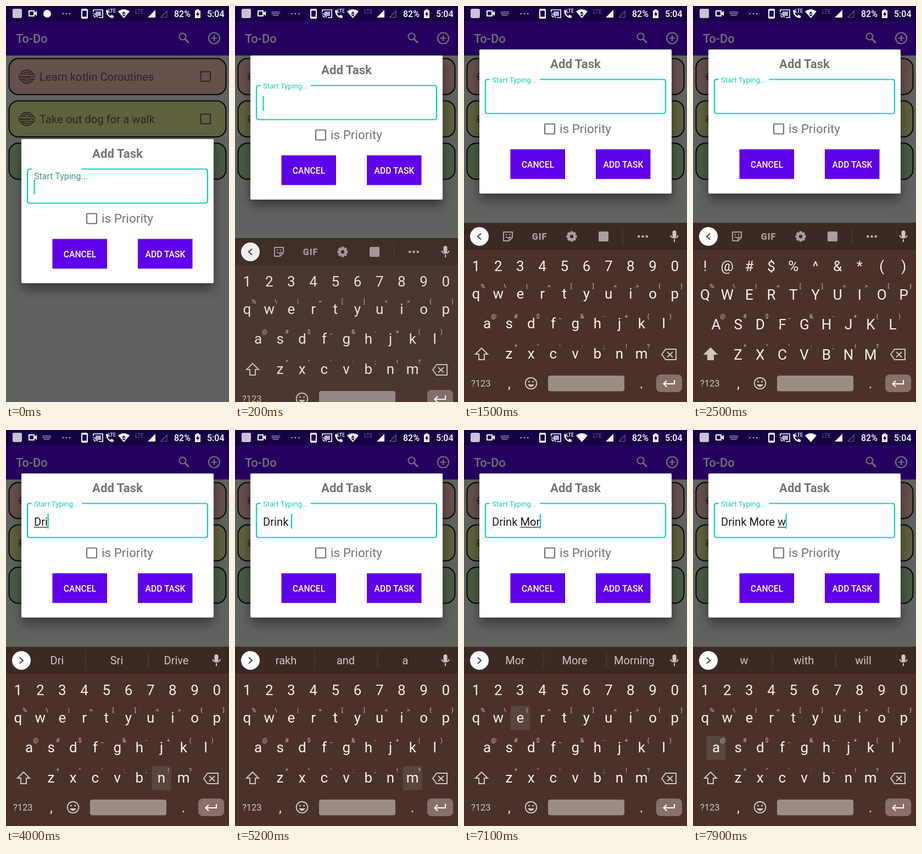
Write an HTML page that moves like this. It is 406 by 720 pixels and loops after 8000 ms.

```html
<!DOCTYPE html>
<html lang="en">
<head>
<meta charset="utf-8">
<title>Add task</title>
<style>
html, body { margin: 0; width: 100%; height: 100%; overflow: hidden; background: #606260; }
svg { display: block; width: 100vw; height: 100vh; font-family: Roboto, "Noto Sans", sans-serif; }
text { white-space: pre; }
.mid { text-anchor: middle; }
.line { fill: none; stroke-width: 2; }
#dialog { filter: drop-shadow(0 11px 10px rgba(0, 0, 0, .42)); }
</style>
</head>
<body>
<svg id="stage" viewBox="0 0 406 720"></svg>
<script>
const LOOP = 8000, FRAME = 100, GAP = 40.2;
const TEAL = '#08d3c0', SOFT = '#cfc5c1', ICON = '#aaa09c';

const txt = (x, y, s, size, fill, extra = '') =>
  `<text x="${x}" y="${y}" font-size="${size}" fill="${fill}" ${extra}>${s.replace(/&/g, '&amp;').replace(/</g, '&lt;')}</text>`;
const mid = (x, y, s, size, fill, extra = '') => txt(x, y, s, size, fill, 'class="mid" ' + extra);
const rect = (x, y, w, h, fill, r = 0, extra = '') =>
  `<rect x="${x}" y="${y}" width="${w}" height="${h}" rx="${r}" fill="${fill}" ${extra}/>`;
const disc = (x, y, r, fill, extra = '') => `<circle cx="${x}" cy="${y}" r="${r}" fill="${fill}" ${extra}/>`;
const fill = (d, color) => `<path d="${d}" fill="${color}"/>`;
const line = (d, color, w = 2) => `<path d="${d}" fill="none" stroke="${color}" stroke-width="${w}"/>`;
const dots = (x, y, step, r, color) => [-1, 0, 1].map(i => disc(x + i * step, y, r, color)).join('');

function statusBar() {
  const w = '#fff';
  return rect(0, 0, 406, 28, '#180046') +
    rect(12, 5, 17, 17, '#c9c2d6', 3) +
    line('M42 9H51V18H42Z', w) + fill('M51 13L56 9V18L51 14Z', w) +
    `<g id="notice">${disc(75, 14, 7, w)}</g>` +
    `<g id="keysIcon">${line('M67 11H82M67 14H82M69 17H80', '#a79dbb', 1.8).replace('/>', ' stroke-dasharray="1.8 1"/>')}</g>` +
    dots(110, 14, 6.3, 1.1, w) +
    rect(138, 6, 10, 16, 'none', 1.5, `stroke="${w}" stroke-width="2"`) +
    line('M138 7H148M138 21H148', w, 3) +
    line('M159 11V7H176V21H169M159 14A7 7 0 0 1 166 21M159 17.5A4 4 0 0 1 162.5 21', w, 1.7) +
    rect(163, 10, 10, 8, '#b8aed0') +
    fill('M182 8L185 7L187 11L185.500 13Q187 17 190 18L192 16L196 18V21Q193 23 188 20Q182 15 182 8Z', w) +
    txt(186, 12, 'LTE', 8.5, w, 'font-weight="500"') +
    fill('M204 10Q214.500 2 225 10L214.500 22Z', w) +
    `<g id="net">${fill('M211 14L214.500 10L218 14ZM211 15.500H218L214.500 19Z', '#180046')}</g>` +
    txt(235, 14, 'LTE', 10, '#6a5a8a') +
    fill('M258 21L272 7V21Z', w) + line('M282 20.500L293 9V20.500Z', '#6a5a8a', 1.2) +
    txt(306, 20, '82%', 16, w, 'font-weight="500"') +
    fill('M347 6H351V8H354V22H344V8H347Z', w) +
    fill('M350 9.500L346 16H348.500V20L352.500 13.500H350Z', '#180046') +
    txt(366, 20, '5:04', 16, w, 'font-weight="500"');
}

function appBar() {
  const c = '#746e7b';
  return rect(0, 28, 406, 62, '#26005e') +
    txt(18, 67, 'To-Do', 22, c, 'font-weight="500"') +
    disc(321.500, 55.500, 6, 'none', `stroke="${c}" stroke-width="2.2"`) +
    line('M326 60L333 67', c, 2.8) +
    disc(379, 58.500, 10, 'none', `stroke="${c}" stroke-width="2.2"`) +
    line('M373.500 58.500H384.500M379 53V64', c, 2.2);
}

function card(y, color, label) {
  const ink = '#2e2726';
  const stamp = `<g transform="translate(38 ${y + 33})">` +
    disc(0, 0, 12, 'none', 'stroke="#1a1717" stroke-width="1.5"') +
    disc(0, 0, 8.500, 'none', 'stroke="#1a1717" stroke-width="1.3"') +
    rect(-14, -4.500, 28, 9, color, 1, 'stroke="#1a1717"') +
    mid(0, 2.200, 'PRIORITY', 5.6, '#1a1717', 'font-weight="900"') + '</g>';
  return rect(5.500, y, 395, 65.500, color, 17, 'stroke="#050505" stroke-width="2"') +
    (label ? stamp + txt(61, y + 40, label, 20.3, ink) +
      rect(354.500, y + 24, 17.500, 17.500, 'none', 1.5, `stroke="${ink}" stroke-width="2"`) : '');
}

// Coordinates below are relative to the dialog's top edge.
function dialog() {
  const gray = '#747474';
  const button = (x, label) => rect(x, 181.500, 99.500, 54, '#5f00ea') +
    mid(x + 50, 214.500, label, 15.7, '#fff', 'font-weight="500"');
  return rect(28, 0, 350, 262, '#fefffe', 2) +
    mid(203, 34, 'Add Task', 22.2, gray, 'font-weight="700"') +
    line('M138 54.500H363Q367 54.500 367 58.500V112.500Q367 116.500 363 116.500H43Q39 116.500 39 112.500V58.500Q39 54.500 43 54.500H47', TEAL, 2.2) +
    '<text id="label" x="51">Start Typing...</text>' +
    txt(51, 95, '', 20.2, '#1c1c1c', 'id="entry"') +
    '<rect id="under" y="97" height="1.3" fill="#222"/>' +
    `<rect id="caret" y="73.500" width="2.2" height="27" fill="${TEAL}"/>` +
    rect(147, 135.500, 18, 18, 'none', 1.5, `stroke="${gray}" stroke-width="2.2"`) +
    txt(174, 151.500, 'is Priority', 22.5, gray) +
    button(84.500, 'CANCEL') + button(240, 'ADD TASK');
}

const ROWS = [
  { keys: 'qwertyuiop', hints: '%\\|=[]<>{}', x: 22, y: 523 },
  { keys: 'asdfghjkl', hints: '@#$_&-+()', x: 42, y: 577.5 },
  { keys: 'zxcvbnm', hints: '*"\':;!?', x: 82, y: 632.5 }
];
const spots = { shift: [32, 633], back: [373, 633], ' ': [222.5, 686] };
ROWS.forEach(r => [...r.keys].forEach((k, i) => { spots[k] = [r.x + GAP * i, r.y + .5]; }));

function letters(upper) {
  const top = [...(upper ? '!@#$%^&*()' : '1234567890')];
  return top.map((s, i) => mid(22 + GAP * i, 482, s, 26, '#f3eeec')).join('') +
    ROWS.map(r => [...(upper ? r.keys.toUpperCase() : r.keys)].map((s, i) =>
      mid(r.x + GAP * i, r.y + (upper ? 10.5 : 8.5), s, 26, '#f7f2f0')).join('')).join('');
}

function toolbar() {
  const teeth = [0, 45, 90, 135].map(a =>
    rect(193.500, 409.500, 5, 19, ICON, 1, `transform="rotate(${a} 196 419)"`)).join('');
  return line('M72 411H88V421L82 427H72Z', ICON) + line('M76 419Q80 424 84 419M88 421H82V427', ICON, 1.6) +
    disc(77, 415.500, 1.2, ICON) + disc(83, 415.500, 1.2, ICON) +
    mid(137.500, 424.500, 'GIF', 16, ICON, 'font-weight="900" letter-spacing="1"') +
    teeth + disc(196, 419, 7, ICON) + disc(196, 419, 3.2, '#3d2923') +
    rect(245, 410, 18, 18, ICON, 2) +
    rect(288.500, 406, 1, 26, '#574640') + dots(325.500, 419, 7.3, 2.3, '#b9afab');
}

function keyboard() {
  const hints = ROWS.map(r => [...r.hints].map((s, i) =>
    mid(r.x + GAP * i + 12.3, r.y - 10, s, 11, '#cbbfba')).join('')).join('');
  return rect(0, 394, 406, 390, '#4a322b') + rect(0, 394, 406, 49, '#3d2923') +
    disc(28, 419, 17, '#fff') + line('M31 413.500L25 419L31 424.500', '#4a3a36').replace('<path', '<path id="chevron"') +
    `<g id="tools">${toolbar()}</g><g id="tips">` +
    [93, 201.500, 310].map(x => mid(x, 426, '', 20, SOFT)).join('') +
    rect(144.500, 404, 1, 29, '#54423c') + rect(259, 404, 1, 29, '#54423c') + '</g>' +
    rect(379.500, 408, 7, 13, SOFT, 3.500) + line('M376 417A7.500 7.500 0 0 0 390 417M383 424V429', SOFT) +
    rect(153, 672, 139, 28.500, '#9b8c86', 4) +
    '<rect id="press" rx="3" fill="#fff" fill-opacity=".09"/>' + hints +
    `<g id="lower">${letters(false)}</g><g id="upper">${letters(true)}</g>` +
    line('M32 622L43 633H37V643H27V633H21Z', SOFT).replace('<path', '<path id="shift"') +
    line('M367 624H386V643H367L360 633.500ZM370 629L380 638.500M380 629L370 638.500', SOFT) +
    txt(13, 692, '?123', 16.5, SOFT) + mid(82.500, 695, ',', 25, '#eee8e5') + mid(323, 695, '.', 25, '#eee8e5') +
    disc(122, 686, 10.300, 'none', `stroke="${SOFT}" stroke-width="2"`) +
    disc(118.300, 683, 1.600, SOFT) + disc(125.700, 683, 1.600, SOFT) + fill('M116 688H128Q122 697 116 688Z', SOFT) +
    rect(350, 670, 47, 32, '#89706a', 8) + line('M383 680V687H364M369 681.500L363.500 687L369 692.500', '#fff', 2.2);
}

const $ = id => document.getElementById(id);
$('stage').innerHTML = appBar() + card(95.500, '#66504c', 'Learn kotlin Coroutines') +
  card(172.500, '#5f603e', 'Take out dog for a walk') + card(249.500, '#495a43') + statusBar() +
  `<g id="dialog">${dialog()}</g><g id="keyboard">${keyboard()}</g>`;

// [time, entered text, pressed key, upper case]
const STEPS = [
  [0, ''], [1900, '', 'shift'], [2000, '', '', 1], [3400, '', 'd', 1],
  [3500, 'D', ''], [3600, 'D', 'r'], [3700, 'Dr', ''], [3800, 'Dr', 'i'], [3900, 'Dri', ''],
  [4000, 'Dri', 'n'], [4100, 'Drin', ''], [4300, 'Drin', 'k'], [4400, 'Drink', ''],
  [4700, 'Drink', ' '], [4800, 'Drink ', ''], [5200, 'Drink ', 'm'], [5300, 'Drink m', ''],
  [5800, 'Drink m', 'back'], [5900, 'Drink ', ''], [6000, 'Drink ', 'shift'], [6100, 'Drink ', '', 1],
  [6200, 'Drink ', 'm', 1], [6300, 'Drink M', ''], [6700, 'Drink M', 'o'], [6800, 'Drink Mo', ''],
  [6900, 'Drink Mo', 'r'], [7000, 'Drink Mor', ''], [7100, 'Drink Mor', 'e'], [7200, 'Drink More', ''],
  [7300, 'Drink More', ' '], [7400, 'Drink More ', ''], [7600, 'Drink More ', 'w'],
  [7700, 'Drink More w', ''], [7900, 'Drink More w', 'a']
];
const TIPS = {
  D: 'D Do Did', Dr: 'Dr Dear Sr', Dri: 'Dri Sri Drive', Drin: 'Drin Drink Drinks',
  Drink: 'Drink Drinks Drinking', 'Drink ': 'rakh and a', m: 'm my me', M: 'M My Me',
  Mo: 'Mo More Most', Mor: 'Mor More Morning', More: 'More Mores Moreover',
  'Drink More ': 'than about of', w: 'w with will'
};
const DIALOG_LAG = [163, 70, 11], KEYS_LAG = [326, 90, 28, 6], KEYS_ALPHA = [0, .55, .9, .98], FLOAT = [0, .7];
const at = (list, t, rest) => list[t / FRAME] ?? rest;
const show = (id, on) => $(id).setAttribute('visibility', on ? 'visible' : 'hidden');
const set = (id, attrs) => Object.entries(attrs).forEach(([k, v]) => $(id).setAttribute(k, v));
const within = (t, a, b) => t >= a && t < b;

function width(s) {
  $('entry').textContent = s;
  return s ? $('entry').getComputedTextLength() : 0;
}

function draw(t) {
  const [, text, key, upper] = STEPS.findLast(s => s[0] <= t);
  const start = text.lastIndexOf(' ') + 1, word = text.slice(start);

  set('dialog', { transform: `translate(0 ${79 + at(DIALOG_LAG, t, 0)})` });
  set('keyboard', { transform: `translate(0 ${at(KEYS_LAG, t, 0)})`, opacity: at(KEYS_ALPHA, t, 1) });
  const p = at(FLOAT, t, 1);
  set('label', { y: 73 - 13 * p, 'font-size': 16 - 2.7 * p, fill: p ? '#12cbb9' : '#46918b' });

  const before = width(text.slice(0, start)), full = width(text);
  set('under', { x: 51 + before, width: word ? full - before : 0 });
  set('caret', { x: 50.5 + full });
  show('caret', t < 400 || within(t, 1000, 1400) || within(t, 2000, 2400) || t >= 3000);

  show('notice', t < 200);
  show('keysIcon', t >= 200);
  show('net', t < 400 || within(t, 1400, 2000) || within(t, 2400, 5300) || within(t, 5900, 6400));
  show('lower', !upper);
  show('upper', upper);
  set('shift', { fill: upper ? SOFT : 'none' });

  show('press', key);
  if (key) {
    const [x, y] = spots[key], w = key === ' ' ? 139 : 35, h = key === ' ' ? 28.5 : 44;
    set('press', { x: x - w / 2, y: y - h / 2, width: w, height: h });
  }

  show('tools', !text);
  show('tips', text);
  set('chevron', { transform: text ? 'rotate(180 28 419)' : '' });
  const tips = (TIPS[word || text] || '').split(' ');
  $('tips').querySelectorAll('text').forEach((el, i) => {
    const tip = tips[i] || '';
    el.textContent = upper ? tip.charAt(0).toUpperCase() + tip.slice(1) : tip;
  });
}

let last = -1;
function tick() {
  const t = Math.floor(performance.now() % LOOP / FRAME) * FRAME;
  if (t !== last) draw(last = t);
  requestAnimationFrame(tick);
}
tick();
</script>
</body>
</html>
```
